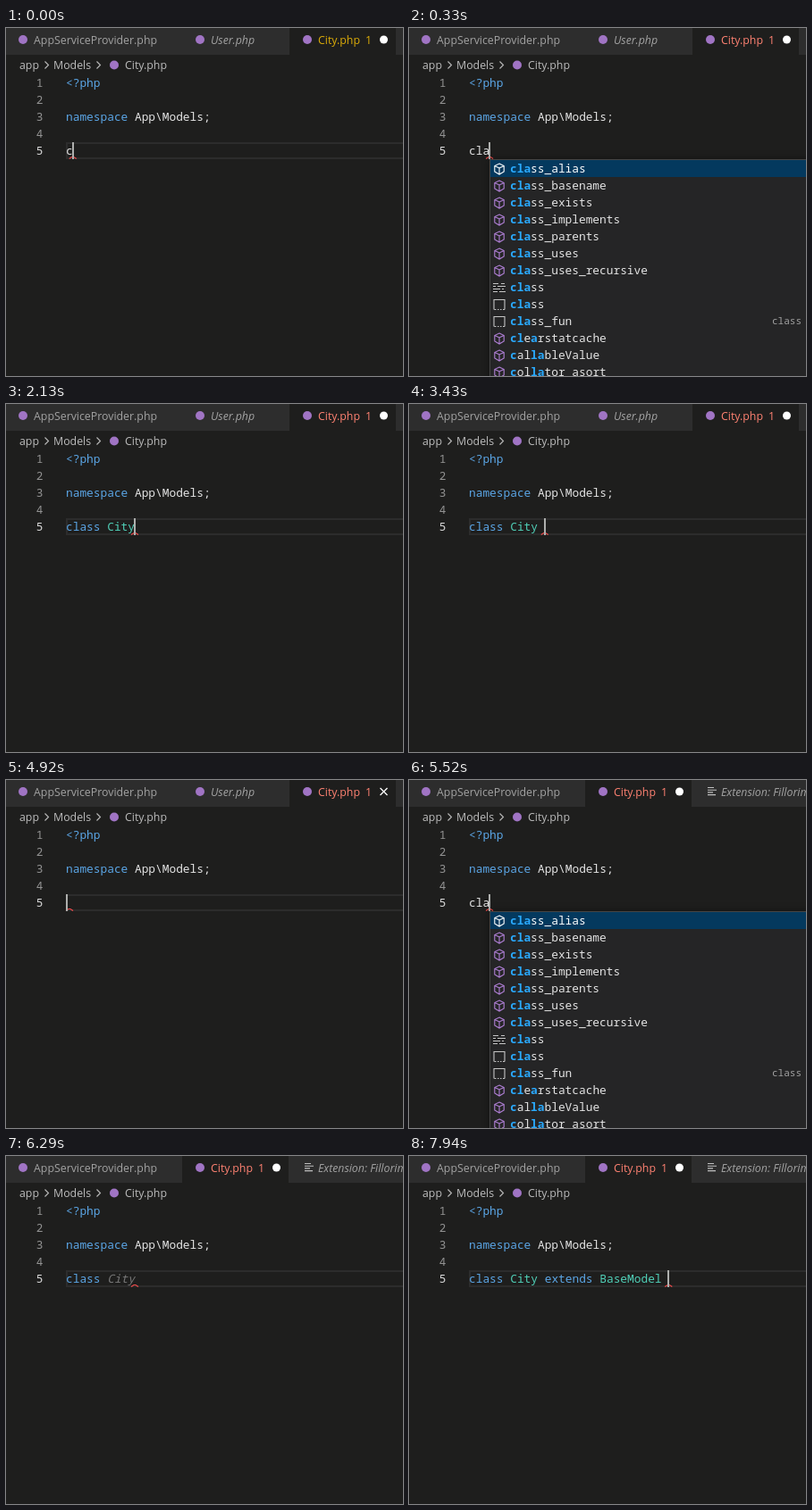
Recreate the animation shown at these times as an HTML page. Size 444 by 390 pixels, loop 8000 ms.

```html
<!DOCTYPE html>
<html lang="en">
<head>
<meta charset="utf-8">
<title>Code completion</title>
<style>
  html, body { margin: 0; width: 100%; height: 100%; overflow: hidden; background: #1e1e1e; }
  svg { display: block; }
  text { white-space: pre; }
  .ui { font: 12.35px "Open Sans", "Noto Sans", sans-serif; }
  .code { font: 12.83px "Noto Sans Mono", "DejaVu Sans Mono", monospace; }
  .detail { font-size: 11px; }
  .italic { font-style: italic; }
</style>
</head>
<body>
<svg id="stage" width="444" height="390" viewBox="0 0 444 390"></svg>
<script>
const LOOP = 8000, LEFT = 67, CHAR = 7.7, ROW = 19, LINE_TOP = 128;
const BACK = '#1e1e1d', BLUE = '#5ba6e6', TEAL = '#50d0b8', PLAIN = '#e4e4e4';
const RED = '#ff8272', YELLOW = '#dcac08', DIM = '#a2a2a2', CRUMB = '#bcbcbc';

// First letter is the kind: keyword, snippet, method or type.
const BY_PREFIX = ['m class_alias', 'm class_basename', 'm class_exists', 'm class_implements',
  'm class_parents', 'm class_uses', 'm class_uses_recursive', 'k class', 's class',
  's class_fun', 'm clearstatcache', 'm callableValue', 'm collator_asort'];
const BY_WORD = ['k class', 's class', 'm class_alias', 'm class_basename', 'm class_exists',
  'm class_implements', 'm class_parents', 'm class_uses', 'm class_uses_recursive',
  's class_fun', 't \\stdClass', 'm get_class', 'm get_class_methods'];

const BASE = 'extends BaseModel';
const popup = { list: true };
const blink = { caret: false };
const next = { second: true };

// [start, typed text, options]
const STEPS = [
  [0, 'c', { warn: true }],
  [60, 'cl', { warn: true }],
  [150, 'cl', { warn: true, ...popup }],
  [240, 'cla', popup],
  [480, 'clas', popup],
  [600, 'class', popup],
  [1100, 'class '],
  [1200, 'class ', { ghost: 'City' }],
  [1630, 'class ', { ghost: 'City', ...blink }],
  [2130, 'class City'],
  [2440, 'class City '],
  [2930, 'class City ', blink],
  [3430, 'class City '],
  [3930, 'class City'],
  [4110, 'class '],
  [4550, 'class'],
  [4920, ''],
  [4980, '', next],
  [5060, 'c', next],
  [5180, 'c', { ...next, ...popup }],
  [5270, 'cl', { ...next, ...popup }],
  [5430, 'cla', { ...next, ...popup }],
  [5670, 'clas', { ...next, ...popup }],
  [5750, 'class', { ...next, ...popup }],
  [5850, 'class ', next],
  [5910, 'class ', { ...next, ghost: 'City' }],
  [6290, 'class ', { ...next, ghost: 'City', ...blink }],
  [6410, 'class City', next],
  [6550, 'class City ', next],
  [6660, 'class City ', { ...next, ghost: BASE }],
  [7150, 'class City ', { ...next, ghost: BASE, ...blink }],
  [7590, 'class City ' + BASE, next],
  [7940, 'class City ' + BASE + ' ', next]
];

const escape = s => s.replace(/&/g, '&amp;').replace(/</g, '&lt;');
const rect = (x, y, w, h, fill) => `<rect x="${x}" y="${y}" width="${w}" height="${h}" fill="${fill}"/>`;
const circle = (x, y, r, fill) => `<circle cx="${x}" cy="${y}" r="${r}" fill="${fill}"/>`;
const path = (d, color, width = 1, x = 0, y = 0) =>
  `<path d="${d}" fill="none" stroke="${color}" stroke-width="${width}" transform="translate(${x} ${y})"/>`;
const span = (s, fill, extra = '') => `<tspan fill="${fill}" ${extra}>${escape(s)}</tspan>`;
const text = (x, y, inner, fill, cls = 'ui', extra = '') =>
  `<text x="${x}" y="${y}" fill="${fill}" class="${cls}" ${extra}>${inner}</text>`;
const fileMark = (x, y) => circle(x, y, 5, '#a074c4');
const column = n => LEFT + n * CHAR;

function tokens(line) {
  return line.split(/(\b(?:class|extends|namespace|City|BaseModel)\b|<\?php)/).map(part => {
    const color = /^(class|extends|namespace|<\?php)$/.test(part) ? BLUE
      : /^(City|BaseModel)$/.test(part) ? TEAL : PLAIN;
    return part && span(part, color);
  }).join('');
}

function tabs({ second, warn }, modified) {
  const active = second ? 197 : 317;
  const color = warn ? YELLOW : RED;
  const end = active + 105;
  let out = rect(0, 0, 444, 30, '#2d2d2d') + rect(active, 0, 119, 30, BACK);
  out += fileMark(19, 13) + text(31, 18, 'AppServiceProvider.php', DIM);
  out += second
    ? path('M334 8.5h7M334 11.2h10M334 13.9h6M334 16.6h9', '#c0c0c0', 1.1)
      + text(349, 18, 'Extension: Fillorim', DIM, 'ui italic')
    : fileMark(217, 13) + text(229, 18, 'User.php', DIM, 'ui italic');
  out += fileMark(active + 20, 13) + text(active + 32, 18, 'City.php', color)
    + text(active + 85, 18, '1', color);
  return out + (modified ? circle(end + .5, 13, 4.5, '#fff')
    : path('M-4-4L4 4M4-4L-4 4', '#fff', 1.3, end + .5, 13));
}

function breadcrumb() {
  const chevron = x => path('M-2-4L2 0L-2 4', CRUMB, 1.1, x, 41.5);
  return text(15, 46, 'app', CRUMB) + chevron(45.5) + text(53, 46, 'Models', CRUMB)
    + chevron(103.5) + fileMark(121, 41.5) + text(133, 46, 'City.php', CRUMB);
}

function icon(kind, x, y, selected) {
  const light = selected ? '#fff' : '#c5c5c5';
  switch (kind) {
    case 'm': return path('M0-6L5.2-3.5V3L0 6L-5.2 3V-3.5ZM-5.2-3.5L0-1L5.2-3.5M0-1V6',
      selected ? '#fff' : '#b180d7', 1.1, x, y);
    case 's': return path('M-6 5.5V-5.5H6V5.5M-5.5 5.5h2m1.5 0h1.5m1.5 0h1.5m1.5 0h2', light, 1.1, x, y);
    case 'k': return path('M-7-4.5h6M2-4.5h4M-7-1.5h3M-2-1.5h9M-7 1.5h8M3 1.5h2M-7 4.5h5M0 4.5h7', light, 1.2, x, y);
    default: return path('M-6-1L-2-5L1-2L-3 2ZM-1-1H3M1-1V4H3M3-1L5-3L7-1L5 1ZM3 4L5 2L7 4L5 6Z', '#ee9d28', 1.2, x, y);
  }
}

// Matched letters: one run, or a leading run followed by a second one.
function matches(word, query) {
  const low = word.toLowerCase();
  const whole = low.indexOf(query);
  if (whole >= 0) return [[whole, query.length]];
  for (let k = query.length - 1; k > 0; k--) {
    const rest = low.indexOf(query.slice(k), k);
    if (low.startsWith(query.slice(0, k)) && rest >= 0) return [[0, k], [rest, query.length - k]];
  }
  return [];
}

function highlighted(word, query, color) {
  let out = '', at = 0;
  for (const [start, length] of matches(word, query)) {
    out += span(word.slice(at, start), color)
      + span(word.slice(start, start + length), '#2aaaff', 'font-weight="600"');
    at = start + length;
  }
  return out + span(word.slice(at), color);
}

function suggestions(query) {
  const x = Math.floor(column(query.length)), top = LINE_TOP + ROW;
  const list = query === 'class' ? BY_WORD : BY_PREFIX;
  let out = `<g style="filter:drop-shadow(0 0 4px rgba(0,0,0,.4))">${rect(x, top, 460, 260, '#454545')}</g>`
    + rect(x + 1, top + 1, 459, 259, '#252526') + rect(x + 1, top + 1, 459, ROW, '#04395e');
  list.forEach((item, i) => {
    const word = item.slice(2), y = top + 1 + i * ROW;
    out += icon(item[0], x + 11, y + 10, !i)
      + text(x + 23, y + 14, highlighted(word, query, i ? PLAIN : '#fff'), PLAIN, 'code');
    if (word === 'class_fun') out += text(x + 316, y + 13, 'class', '#a0a0a0', 'code detail');
  });
  return out;
}

function draw([, typed, options = {}]) {
  const { ghost = '', caret = true, list } = options;
  const end = Math.max(LEFT + 4, column(typed.length + ghost.length));
  let out = rect(0, 0, 444, 390, BACK) + tabs(options, typed !== '') + breadcrumb();
  if (!list) out += path('M446 129H68V146H446', '#2c2c2c', 2);
  ['<?php', '', 'namespace App\\Models;', '', typed].forEach((line, i) => {
    const y = 66 + i * ROW;
    out += text(41.5, y, i + 1, i === 4 ? '#dadada' : '#929292', 'code', 'text-anchor="end"')
      + text(LEFT, y, tokens(line), PLAIN, 'code');
  });
  if (ghost) out += text(column(typed.length), 142, ghost, '#787878', 'code italic');
  out += path('M-4 146.5L-1 144.5H1L4 146.5', '#f14c4c', 1.2, end, 0);
  if (caret) out += rect(Math.max(LEFT, Math.floor(column(typed.length) - .6)), LINE_TOP, 2, ROW, '#aeafad');
  if (list) out += suggestions(typed);
  return out;
}

const stage = document.getElementById('stage');
const origin = performance.now();
let shown;

function tick() {
  const time = (performance.now() - origin) % LOOP;
  const step = STEPS.findLast(([start]) => start <= time);
  if (step !== shown) stage.innerHTML = draw(shown = step);
  requestAnimationFrame(tick);
}
tick();
</script>
</body>
</html>
```
